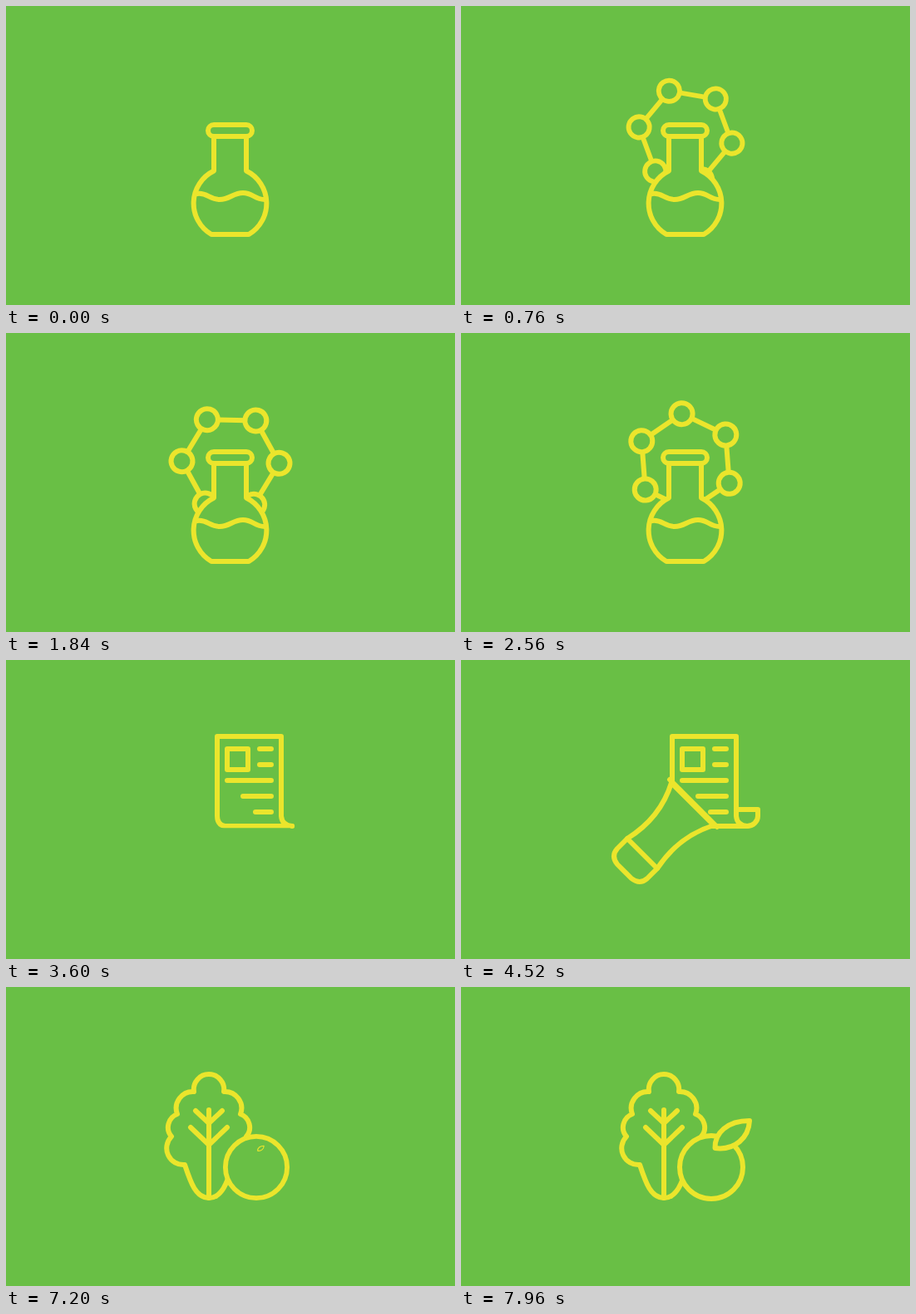
An HTML page for the animation above (8 s loop, 540x360 px).

```html
<!DOCTYPE html>
<html lang="en">
<head>
<meta charset="utf-8">
<title>Line icons</title>
<style>
  html, body { margin: 0; width: 100%; height: 100%; overflow: hidden; background: #69bf45; }
  svg { display: block; width: 100%; height: 100%; }
  .line { fill: none; }
</style>
</head>
<body>
<svg viewBox="0 0 540 360" fill="#69bf45" stroke="#ebe52c" stroke-width="6" stroke-linecap="round" stroke-linejoin="round">
  <clipPath id="wipe"><rect id="wipeBox" x="240" y="80" width="130"/></clipPath>

  <g id="science">
    <g id="ring"></g>
    <path d="M250 157V198.500A43.500 43.500 0 0 0 247 275H292A43.500 43.500 0 0 0 289 198.500V157"/>
    <path class="line" d="M230 226C241 224 245 233 257 233S273 225 285 225S299 233 311 233"/>
    <rect x="243" y="143" width="53" height="14" rx="7"/>
  </g>

  <g id="news">
    <g clip-path="url(#wipe)">
      <path d="M344 200H263Q254 198 254 188V92H331V188Q332 199 344 200"/>
      <path class="line" d="M266 107H291V132H266ZM305 107H319M305 126H319M266 145H319M285 164H319M300 183H319"/>
    </g>
    <path id="curl" class="line" pathLength="1" stroke-dasharray="1 2" d="M344 200A13 12 0 0 0 357 188V180H331"/>
    <g id="horn">
      <path d="M253 148Q240 190 200 215L188 227Q180 236 188 246L205 263Q215 271 224 263L236 251Q262 212 304 199Z"/>
      <path class="line" d="M251 144L308 201M200 215L236 251"/>
    </g>
  </g>

  <g id="food">
    <g id="lettuce">
      <path d="M226 126A18.200 18.200 0 1 1 262 126A20 20 0 0 1 282 153A17 17 0 0 1 289 180A20 20 0 0 1 273 214C266 235 260 254 244 254S222 235 215 214A20 20 0 0 1 199 180A17 17 0 0 1 206 153A20 20 0 0 1 226 126Z"/>
      <path class="line" d="M244 148V254M228 149L244 164L260 149M222 169L244 190L266 169"/>
    </g>
    <circle id="fruit" cx="301" cy="217" r="38"/>
    <path id="leaf" d="M305.500 194C305 176 320 161 347 161C346 181 330 197 305.500 194Z"/>
  </g>
</svg>
<script>
const $ = id => document.getElementById(id);
const clamp = x => Math.min(1, Math.max(0, x));
const progress = (t, start, duration) => clamp((t - start) / duration);

// Ease-out whose overshoot grows with `back`.
const easeOut = (p, back) => 1 + (back + 1) * (p - 1) ** 3 + back * (p - 1) ** 2;

function show(id, visible) {
  $(id).style.display = visible ? "" : "none";
}

function pop(id, x, y, t, start, duration, back = 0.7, angle = 0) {
  const scale = easeOut(progress(t, start, duration), back);
  show(id, t >= start && scale > 0.001);
  $(id).setAttribute("transform",
    `translate(${x} ${y}) rotate(${angle}) scale(${scale}) translate(${-x} ${-y})`);
}

function buildRing() {
  const points = Array.from({ length: 6 }, (_, i) => {
    const a = (i * 60 - 90) * Math.PI / 180;
    return [270 + 58.5 * Math.cos(a), 155.5 + 58.5 * Math.sin(a)];
  });
  $("ring").innerHTML = `<polygon class="line" points="${points.join(" ")}"/>` +
    points.map(([x, y]) => `<circle cx="${x}" cy="${y}" r="13"/>`).join("");
}

function render(t) {
  show("science", t < 3040);
  show("news", t >= 3040 && t < 6080);
  show("food", t >= 6160);

  const angle = -107 * (1 - progress(t, 280, 2520)) ** 1.36;
  pop("ring", 270, 155.5, t, 280, 700, 0, angle);

  $("wipeBox").setAttribute("height", 122 * progress(t, 3040, 560) + 10 * progress(t, 3600, 80));
  const curl = progress(t, 3600, 320);
  show("curl", curl > 0);
  $("curl").setAttribute("stroke-dashoffset", 1 - curl);
  pop("horn", 246, 206, t, 3800, 720, 0.4);

  pop("lettuce", 244, 180, t, 6120, 1000);
  pop("fruit", 301, 217, t, 6790, 780);
  pop("leaf", 302, 198, t, 7160, 780);
}

function tick() {
  render(performance.now() % 8000);
  requestAnimationFrame(tick);
}

buildRing();
tick();
</script>
</body>
</html>
```
